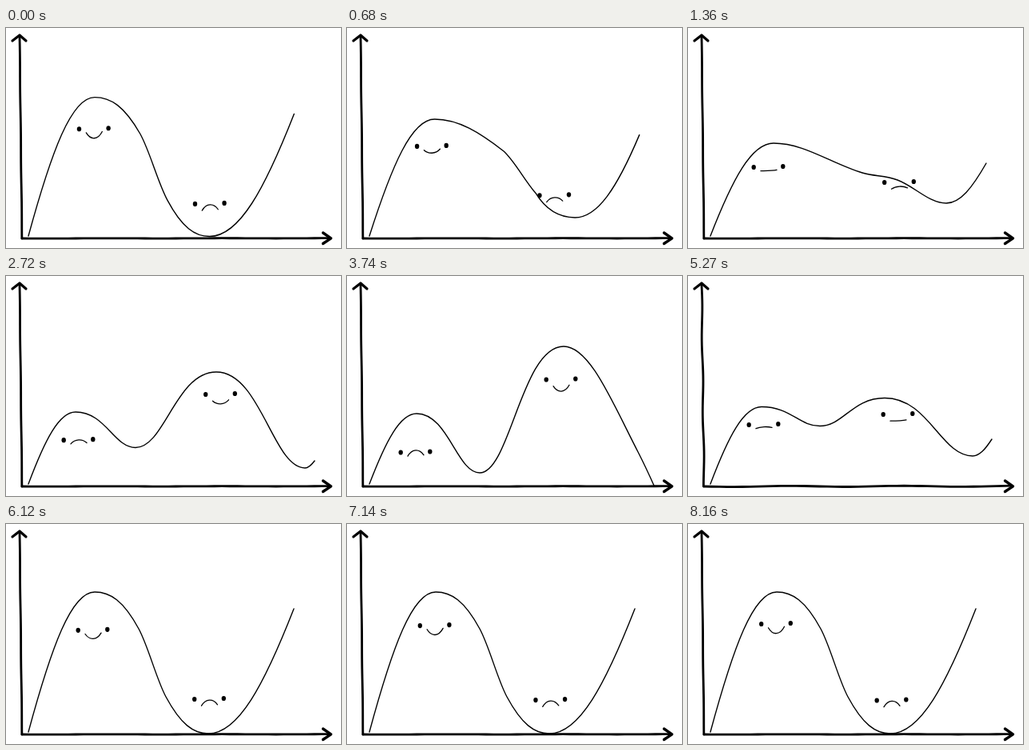
Recreate the animation shown at these times as an HTML page with a canvas. Size 419 by 275 pixels, loop 8.33 s.

```html
<!DOCTYPE html>
<html lang="en">
<head>
<meta charset="utf-8">
<style>
html, body { margin: 0; width: 100%; height: 100%; overflow: hidden; background: #fff; }
canvas { display: block; }
</style>
</head>
<body>
<canvas id="stage" width="419" height="275"></canvas>
<script>
const ctx = document.getElementById('stage').getContext('2d');
const STEP = 170, STEPS = 49, START = [28, 260];

// Key points of the curve: hill, dip, hill, dip, end.
const rest = [[111, 85], [166, 131], [200, 216], [253, 262], [360, 106]];

// Step, curve, centre of the left and right face.
const poses = [
  pose(-1, rest, [110, 124.5], [254.5, 220]),
  pose(8, [[107, 144], [218, 181], [262, 190], [323, 219], [373, 169]], [100.5, 173.5], [264, 192.5]),
  pose(16, [[87, 170], [162, 214.5], [263, 120], [374, 240], [386, 231]], [90.5, 204.7], [268, 147.5]),
  pose(22, [[87, 172], [166, 246], [271, 88], [364, 220], [384, 262]], [85.5, 220], [267.5, 129]),
  pose(31, [[92, 163.5], [165, 187.5], [246, 152.5], [356, 225], [380, 204]], [94.5, 185.5], [262.5, 172.5]),
  pose(36, rest, [108.5, 132.3], [254, 218.5]),
  pose(48, rest, [110, 124.5], [254.5, 220])
];

function pose(at, points, left, right) {
  return { at, values: [...left, ...right, ...smooth([START, ...points])] };
}

// Bezier coordinates through the points: flat at turning points, steeper at the ends.
function smooth(points) {
  const last = points.length - 1;
  const secant = i => (points[i + 1][1] - points[i][1]) / (points[i + 1][0] - points[i][0]);
  const slopes = points.map((_, i) => {
    if (i === 0 || i === last) return 0;
    const a = secant(i - 1), b = secant(i);
    return a * b > 0 ? .55 * (a + b) : 0;
  });
  slopes[0] = 1.75 * secant(0) - .75 * slopes[1];
  slopes[last] = 1.75 * secant(last - 1) - .75 * slopes[last - 1];

  return points.slice(1).flatMap(([x2, y2], i) => {
    const [x1, y1] = points[i], s1 = slopes[i], s2 = slopes[i + 1];
    const between = !s1 && !s2;  // from one turning point to the next: hills are rounder
    const reach = isHill => (x2 - x1) * (between ? (isHill ? .5 : .36) : .35);
    const h1 = reach(y1 < y2), h2 = reach(y2 < y1);
    return [x1 + h1, y1 + h1 * s1, x2 - h2, y2 - h2 * s2, x2, y2];
  });
}

// Monotone interpolation in time, at rest wherever a value turns.
function tween(step, n) {
  const next = poses.findIndex(p => p.at > step);
  const i = (next < 0 ? poses.length : next + 1) - 2;
  const from = Math.min(i, poses.length - 2), to = from + 1;
  const span = poses[to].at - poses[from].at;
  const rate = k => (poses[k + 1].values[n] - poses[k].values[n]) / (poses[k + 1].at - poses[k].at);
  const speed = k => {
    if (k === 0 || k === poses.length - 1) return 0;
    const a = rate(k - 1), b = rate(k);
    return a * b > 0 ? 2 * a * b / (a + b) : 0;
  };
  const u = (step - poses[from].at) / span, ease = u * u * (3 - 2 * u);
  return poses[from].values[n] * (1 - ease) + poses[to].values[n] * ease
    + span * u * (1 - u) * ((1 - u) * speed(from) - u * speed(to));
}

function line(width, ...points) {
  ctx.lineWidth = width;
  ctx.beginPath();
  points.forEach(([x, y]) => ctx.lineTo(x, y));
  ctx.stroke();
}

// A hand-drawn stroke that sways a little along the way.
function axis([x1, y1], [x2, y2], sway) {
  const points = Array.from({ length: 41 }, (_, i) => {
    const u = i / 40, off = sway * Math.sin(u * 17);
    const across = x2 - x1 > y2 - y1;
    return [x1 + (x2 - x1) * u + (across ? 0 : off), y1 + (y2 - y1) * u + (across ? off : 0)];
  });
  line(2.8, ...points);
}

function drawAxes(sway) {
  axis([17, 11], [20, 263], sway);
  axis([20, 263], [405, 262.8], sway);
  line(3.2, [8, 16], [17, 9], [25, 16]);
  line(3.4, [396.5, 256], [406.5, 262.8], [396.5, 269.5]);
}

function drawCurve(path) {
  ctx.lineWidth = 1.4;
  ctx.beginPath();
  ctx.moveTo(...START);
  for (let i = 0; i < path.length; i += 6) ctx.bezierCurveTo(...path.slice(i, i + 6));
  ctx.stroke();
}

// The higher the face, the happier it looks.
function drawFace(x, y, drop) {
  for (const side of [-1, 1]) {
    ctx.beginPath();
    ctx.ellipse(x + side * 18.3, y - side * .5, 2.7, 3.1, 0, 0, 7);
    ctx.fill();
  }
  const mouth = y + drop, bend = mouth + (176 - y) / 5;
  ctx.lineWidth = 1.3;
  ctx.beginPath();
  ctx.moveTo(x - 9.5, mouth + .7);
  ctx.bezierCurveTo(x - 4, bend, x + 5, bend, x + 10.5, mouth - .7);
  ctx.stroke();
}

function draw(now) {
  const step = Math.floor(now / STEP) % STEPS;
  const [lx, ly, rx, ry, ...path] = poses[0].values.map((_, n) => tween(step, n));
  ctx.fillStyle = '#fff';
  ctx.fillRect(0, 0, 419, 275);
  ctx.fillStyle = ctx.strokeStyle = '#000';
  ctx.lineCap = ctx.lineJoin = 'round';
  drawAxes(step % 2 ? .6 : .15);
  drawCurve(path);
  drawFace(lx, ly, 4.5);
  drawFace(rx, ry, 8);
}

const start = performance.now();
function tick() {
  draw(performance.now() - start);
  requestAnimationFrame(tick);
}
tick();
</script>
</body>
</html>
```
